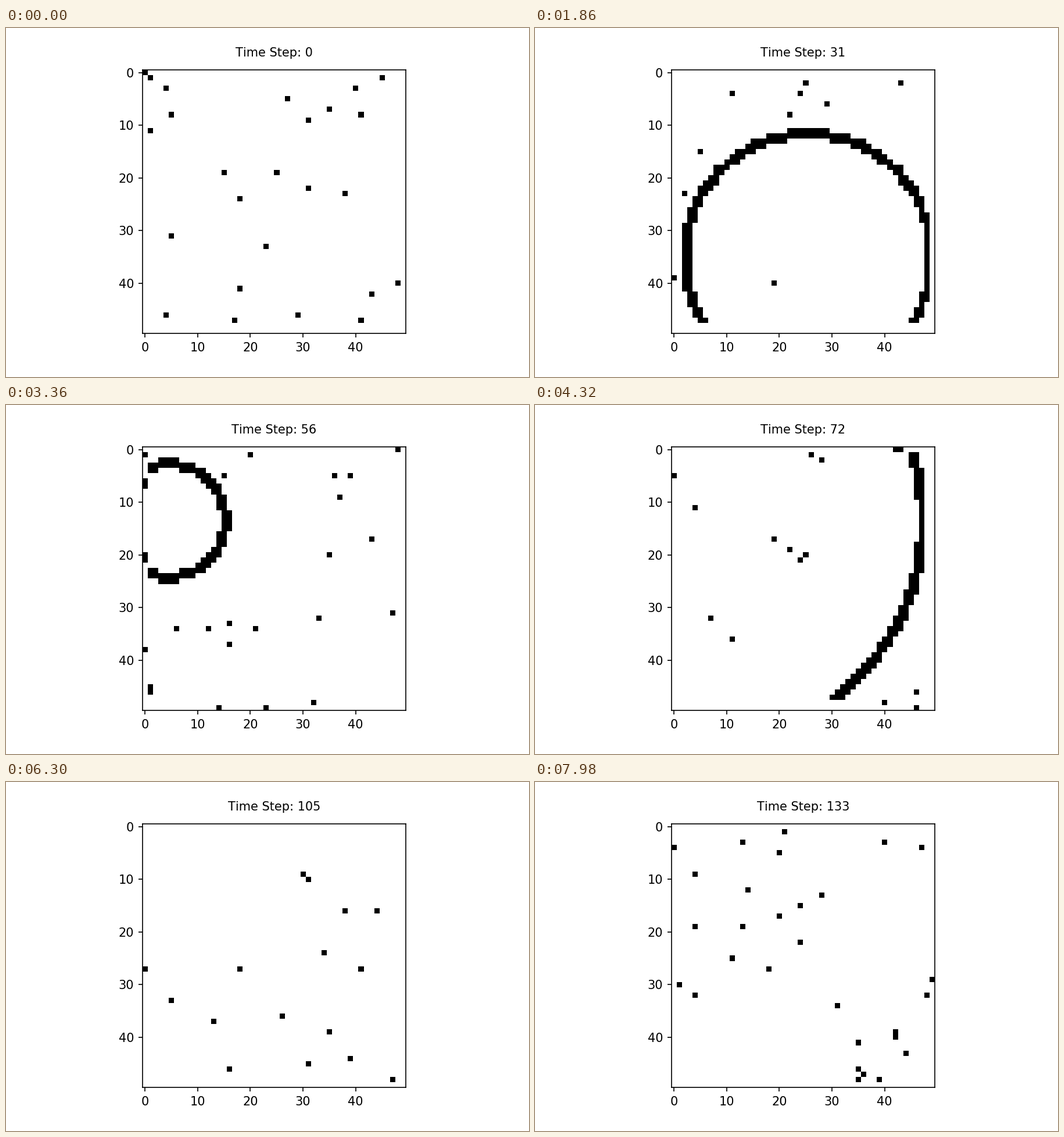
Recreate the animation shown at these times as a matplotlib script. Size 900 by 600 pixels, loop 8000 ms.

```python
import numpy as np
import matplotlib.pyplot as plt
from matplotlib.animation import FuncAnimation

W, H, DPI = 900, 600, 150
N = 50                # cells per side
TICK_MS = 20
LOOP_MS = 8000
STEP_TICKS = 3        # one time step lasts 60 ms
SPEED = 2.0           # cells the wave front travels per step
REST = 7              # steps a cell stays silent after the front
RATE = 0.009          # chance of a spontaneous spike
WAVES = [(25.5, 35.0, 18.8), (4.5, 13.5, 50.15)]   # x, y, start step

yy, xx = np.mgrid[0:N, 0:N]
edge = np.minimum.reduce([xx, yy, N - 1 - xx, N - 1 - yy])
lag = np.where(edge == 0, 2.4, np.where(edge == 1, 0.2, 0.0))


def grid_at(step):
    rng = np.random.default_rng(900 + step)
    spikes = rng.random((N, N)) < RATE
    for cx, cy, start in WAVES:
        front = SPEED * (step - start)
        if front <= 0:
            continue
        dist = np.hypot(xx - cx, yy - cy) + lag
        behind = front - dist
        spikes &= ~((behind > 0) & (behind < SPEED * (1 + REST)))
        ring = (behind > 0) & (behind <= SPEED)
        ring[N - 2:] = False      # the front dies out along the bottom
        spikes |= ring
    return spikes.astype(float)


steps = (LOOP_MS // TICK_MS - 1) // STEP_TICKS + 1
grids = [grid_at(s) for s in range(steps)]

plt.rcParams["font.family"] = "DejaVu Sans"
plt.rcParams["text.kerning_factor"] = 6
fig = plt.figure(figsize=(W / DPI, H / DPI), dpi=DPI, facecolor="white")
side = 453
ax = fig.add_axes([234.75 / W, (528 - side) / H, side / W, side / H])
image = ax.imshow(grids[0], cmap="binary", vmin=0, vmax=1,
                  interpolation="nearest", aspect="auto")
ax.set_xticks(range(0, N, 10))
ax.set_yticks(range(0, N, 10))
title = ax.text(0.5, 1.05, "Time Step: 0", transform=ax.transAxes,
                ha="center", fontsize=10)


def update(tick):
    step = tick // STEP_TICKS
    image.set_data(grids[step])
    title.set_text(f"Time Step: {step}")
    return image, title


anim = FuncAnimation(fig, update, frames=LOOP_MS // TICK_MS,
                     interval=TICK_MS, repeat=True, repeat_delay=0)
plt.show()
```
